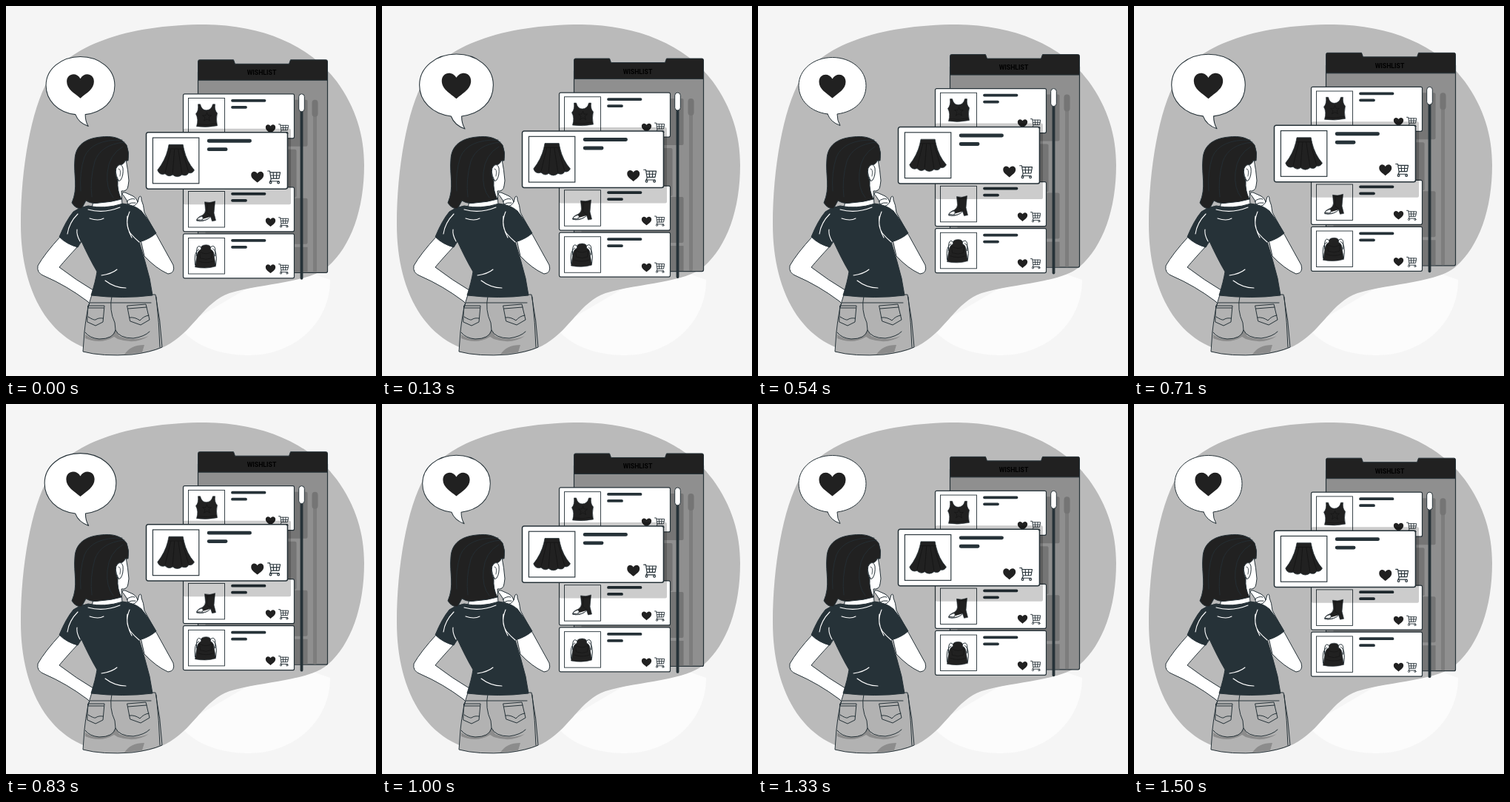
An HTML page that plays this animation: 500 px wide and 500 px high, repeating every 1.54 s.

```html
<!DOCTYPE html>
<html lang="en">
<head>
<meta charset="utf-8">
<title>Wishlist</title>
<style>
html, body { margin: 0; height: 100%; overflow: hidden; background: #f5f5f5; }
svg { display: block; width: 100vw; height: 100vh; }
.line { fill: none; stroke: #263238; stroke-linecap: round; stroke-linejoin: round; }
.skin { fill: #fff; stroke: #263238; stroke-linejoin: round; stroke-linecap: round; }
.item { fill: #212121; stroke: #263238; stroke-width: .6; stroke-linejoin: round; }
.seam { fill: none; stroke: #111; stroke-width: .5; }
.fold { fill: none; stroke: #fff; stroke-width: 1.1; stroke-linecap: round; }
</style>
</head>
<body>
<svg viewBox="0 0 500 500">
<defs>
  <path id="heart" fill="#212121" d="M0-9C-5-18-18-16-18-5C-18 5-8 10 0 17C8 10 18 5 18-5C18-16 5-18 0-9Z"/>
  <g id="card">
    <rect width="150" height="60" rx="2" fill="#fff" stroke="#263238" stroke-width="1.2"/>
    <rect x="7" y="5.700" width="49" height="48.500" fill="#fff" stroke="#263238" stroke-width=".9"/>
    <path class="line" stroke-width="3.8" d="M66.5 9H110M66.5 18H84.500"/>
    <use href="#heart" transform="translate(118 47)scale(.37)"/>
    <g class="line" transform="translate(136 47)" stroke-width=".9">
      <path d="M-7-6h2.200L-3.500 3L-4.500 4.800H5M-4.500-4.500H6.200L5 2H-3.700M-4-1.300H5.600M-1.200-4.500L-.8 2M2.500-4.500L2.200 2"/>
      <circle cx="-4" cy="6.200" r="1.100"/><circle cx="4.300" cy="6.200" r="1.100"/>
    </g>
  </g>
</defs>

<path fill="#fcfcfc" d="M235 435C260 465 300 472 330 472C390 471 438 428 438 370L380 350Z"/>
<path fill="#bababa" d="M270 25C345 26 410 52 447 102C473 138 484 175 484 215C484 275 466 325 435 352C410 374 350 374 302 388C268 400 255 436 222 456C205 467 180 472 155 471C62 470 20 389 20 295C20 220 34 140 57 100C85 55 160 25 270 25Z"/>

<g id="panel">
  <path fill="#8f8f8f" stroke="#263238" stroke-width="1.200" d="M260 90H435V358.500Q435 360.500 433 360.500H262Q260 360.500 260 358.500Z"/>
  <g fill="#757575">
    <rect x="270" y="127" width="138" height="63" rx="2"/>
    <rect x="270" y="194" width="123" height="65" rx="2"/>
    <rect x="270" y="260" width="138" height="62" rx="2"/>
    <rect x="270" y="326" width="138" height="34"/>
    <rect x="415.500" y="130" width="5" height="230" rx="2" fill="#7d7d7d"/>
    <rect x="414" y="127" width="8" height="23" rx="4"/>
  </g>
  <path fill="#212121" stroke="#263238" d="M260 100.500V75Q260 73 262 73H308L310 78.500H383L385 73H433Q435 73 435 75V100.500Z"/>
  <text x="346" y="93.500" text-anchor="middle" font-family="Roboto, sans-serif" font-weight="700" font-size="8.700">WISHLIST</text>
  <path class="line" stroke-width="3.800" d="M400 122V368"/>
  <rect x="396.200" y="119" width="7.600" height="24" rx="3.800" fill="#fff" stroke="#263238"/>

  <g transform="translate(240 119)">
    <use href="#card"/>
    <path class="item" d="M20 14L23 14Q25 22 31 22Q38 22 40 14L43 14Q42 22 46 26Q44 34 46 43Q32 46 18 44Q21 34 17 27Q21 23 20 14Z"/>
    <path class="seam" d="M32 25l1.500 4 4.500 0-3.500 3 1.500 4.500-4-2.500-4 2.500 1.500-4.500-3.500-3 4.500 0ZM19 41Q32 43 45 40"/>
  </g>
  <g transform="translate(240 245)">
    <use href="#card"/>
    <g transform="translate(-1 -1)">
      <path class="item" d="M30 21Q37 23 44 20L42.500 36L45 46L40 47L38 41Q33 47 23 47L19 46Q19 42 27 39Q31 36 31 32Z"/>
      <path class="skin" stroke-width=".7" d="M19.500 45Q21 41.500 26 40.500Q29 42 27 45ZM19.500 46.500Q33 47 38 41"/>
      <path class="seam" d="M34 24L33 36L39 40"/>
    </g>
  </g>
  <g transform="translate(240 308)">
    <use href="#card"/>
    <path class="line" d="M21 21Q14 24 16 42M40 20Q47 24 44 42M24 18Q17 12 18 30M37 18Q45 12 43 30"/>
    <path class="item" d="M18 32Q19 23 24 21Q23 15 31 15Q38 15 37 21Q42 23 42 32L44 44Q31 48 16 45Z"/>
    <path class="seam" d="M22 24Q31 30 39 24L38 33Q31 36 23 33ZM20 37Q31 41 41 37"/>
  </g>

  <rect x="240" y="166" width="145.500" height="102.500" rx="2" opacity=".2"/>
  <g transform="translate(190 171)scale(1.273)">
    <use href="#card"/>
    <path class="item" d="M24 13H39L40 18Q43 31 51 40Q49 44 45 43Q43 47 38 45Q33 49 28 45Q24 48 20 44Q14 46 12 40Q20 30 23 18Z"/>
    <path class="seam" d="M23 17.500H40M26 18L20 43M30 18L28 44M34 18L38 44M38 18L45 42"/>
  </g>
</g>

<g id="bubble">
  <path class="skin" d="M94 146C70 143 55 127 55 107.500C55 86 75 69.500 100.500 69.500S146 86 146 107.500C146 129 130 143 107 146Q107 155 111 161.500Q98 157 94 146Z"/>
  <use href="#heart" x="100.500" y="107.500"/>
</g>

<g id="woman">
  <path class="skin" d="M74 311Q52 335 43 351Q41 361 52 365Q82 378 110 399L116 405L121 386Q94 370 72 353Q82 341 97 325Z"/>
  <path class="skin" d="M164 264Q160 257 157 254Q157 251 161 252L172 257Q177 260 178 265L180 258Q183 255 183 262Q186 268 187 279Q201 305 226 350Q229 361 219 362Q203 355 187 338L175 285Q163 273 164 264Z"/>
  <path class="line" d="M163 264Q169 259 174 261M164 268Q170 265 175 266M178 265Q175 271 168 271"/>

  <path fill="#b2b2b2" stroke="#263238" d="M116 390Q109 410 106 440L104 467Q130 474 170 471Q195 468 211 461Q209 425 202 390Z"/>
  <path fill="#8c8c8c" d="M107 444Q122 455 143 446L148 438L153 446Q172 454 193 446Q175 458 151 450L146 447Q128 458 107 449ZM160 471Q168 458 187 458L184 468Z"/>
  <path class="line" d="M143 392Q139 411 147 428L148 438Q145 450 126 450Q113 449 107 441M148 438Q153 449 172 449Q187 447 194 440M203 393Q207 428 208 461M111 406L113 401L196 401M111 405L133 405L131 427L121 432L110 427ZM112 408L132 408M111 420Q119 425 121 424Q125 421 131 422M164 405L189 403L194 424L182 431L168 426ZM165 409L190 407M167 421Q174 420 181 425Q186 419 193 418"/>

  <path class="skin" d="M119 262L116 272Q135 279 157 270L156 250Q164 251 165 243L166 236Q165 222 162 207L147 207Z"/>
  <path fill="#263238" stroke="#263238" d="M111 270Q133 275 158 267Q174 269 183 277Q193 289 203 307Q194 315 180 319Q188 344 194 368L198 391Q158 396 115 391Q121 372 123 359Q113 342 102 318L97 326Q82 322 72 312Q81 290 91 278Q99 272 111 270Z"/>
  <path class="fold" d="M111 275Q132 281 154 272M113 287Q125 291 132 287M97 281Q85 293 83 308M100 318Q95 309 96 302M167 278Q160 295 168 307Q174 314 180 319M164 284Q162 298 170 313M134 371Q147 381 162 381M129 364Q143 362 150 356"/>

  <path fill="#212121" stroke="#263238" d="M128 177C106 179 94 189 93 207C91 229 98 245 89 266Q94 274 102 274Q106 267 108 263Q116 268 126 266Q143 265 156 261Q150 250 151 236Q145 222 152 216Q160 214 161 209L165 209Q167 198 163 188C156 178 143 175 128 177Z"/>
  <path class="skin" d="M152 236Q145 222 151 216Q156 212 158 219Q159 229 155 235Q154 237 152 236Z"/>
  <path class="line" stroke-width=".8" d="M152 220Q156 220 154 230M160 184Q128 187 120 210Q113 235 116 258M157 181Q116 180 106 204Q99 225 101 250M158 190Q139 201 137 225Q135 247 145 259"/>
</g>
</svg>
<script>
const LOOP = 1540, CYCLE = 1500, LEAD = 30;
const panel = document.getElementById('panel');
const bubble = document.getElementById('bubble');

// One beat: a quick rise over 150 ms, then a fall over 300 ms.
const beat = t => Math.max(0, Math.min(t / 150, (450 - t) / 300));

function draw(now) {
  const t = now % LOOP + LEAD;
  const phase = t < CYCLE ? t : Math.max(0, t - LOOP);
  const rise = 10 * (1 - Math.abs(phase - CYCLE / 2) / (CYCLE / 2));
  const scale = 1 + .1 * (beat(phase) + beat(phase - 600));
  panel.setAttribute('transform', `translate(-.5 ${.2 - rise})`);
  bubble.setAttribute('transform', `translate(100.5 115.5) scale(${scale}) translate(-100.5 -115.5)`);
}

const start = performance.now();
function tick() {
  draw(performance.now() - start);
  requestAnimationFrame(tick);
}
tick();
</script>
</body>
</html>
```
